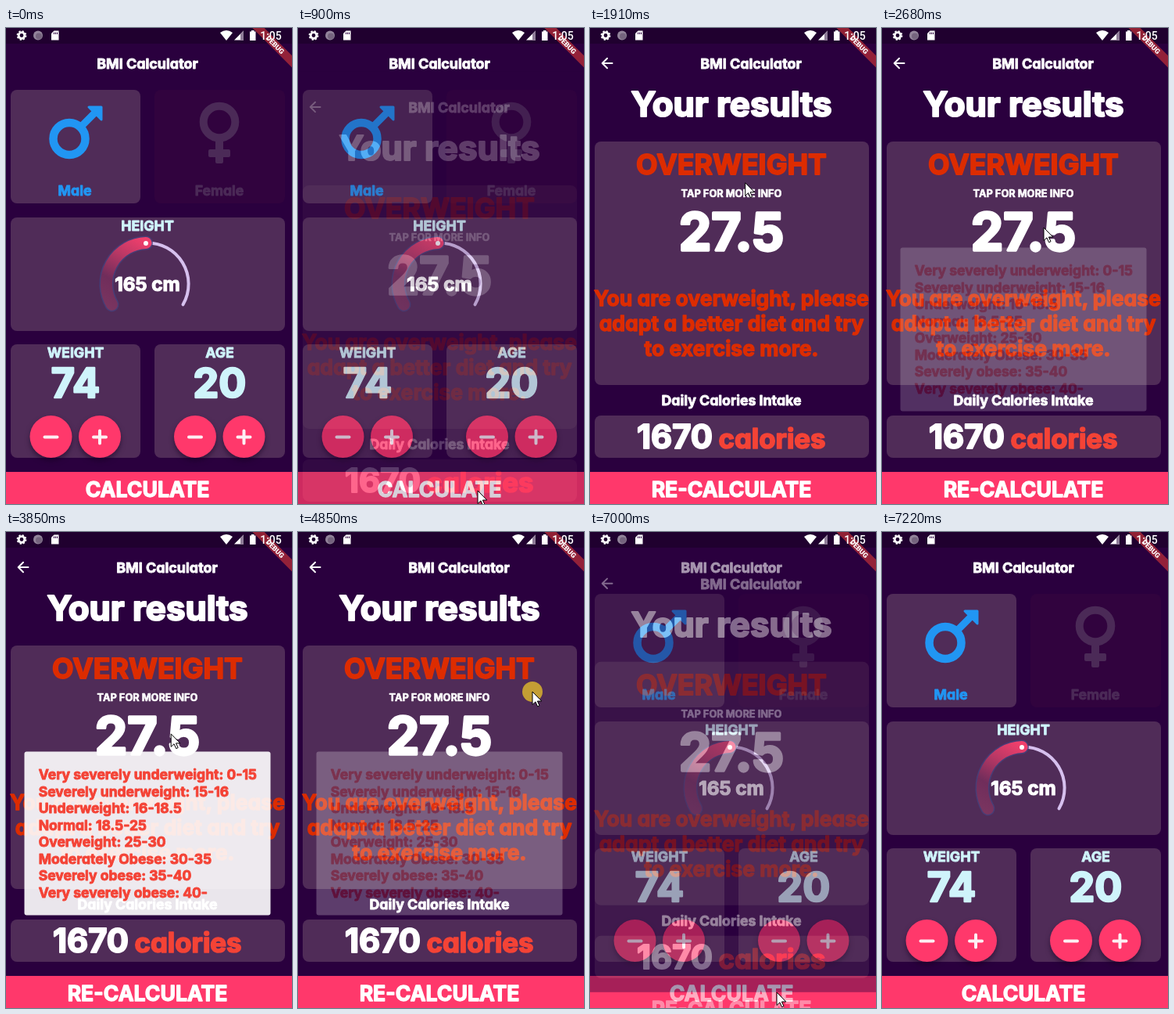
An HTML page that plays this animation: 366x608 px, repeating every 7810 ms.

```html
<!DOCTYPE html>
<html lang="en">
<head>
<meta charset="utf-8">
<title>BMI Calculator</title>
<style>
html, body { margin: 0; width: 100%; height: 100%; overflow: hidden; background: #2a003e; }
svg { display: block; width: 100%; height: 100%; }
.t {
  font-family: Inter, sans-serif; font-weight: 700; font-feature-settings: "cv11";
  stroke-width: .05em; stroke-linejoin: round;
}
.sys { font-family: Roboto, sans-serif; fill: #fff; }
.line { fill: none; stroke-linecap: round; stroke-linejoin: round; }
.btn { filter: drop-shadow(0 4px 3px rgba(20, 0, 30, .5)); }
</style>
</head>
<body>
<svg id="stage" viewBox="0 0 366 608"></svg>
<script>
const LOOP = 7810;
const BG = '#2a003e', CARD = '#502c58', PINK = '#ff386b', RED = '#f44336',
      ALERT = '#dd2c00', BLUE = '#2196f3', ICE = '#cff4fb', DIM = '#4b2a57', WHITE = '#fff';

// Drawing helpers
const text = (x, y, size, str, fill = WHITE, anchor = 'middle') =>
  `<text class="t" x="${x}" y="${y}" font-size="${size}" text-anchor="${anchor}" fill="${fill}" stroke="${fill}">${str}</text>`;
const rect = (x, y, w, h, fill = CARD, r = 8) =>
  `<rect x="${x}" y="${y}" width="${w}" height="${h}" rx="${r}" fill="${fill}"/>`;
const line = (d, stroke, width, extra = '') =>
  `<path class="line" d="${d}" stroke="${stroke}" stroke-width="${width}" ${extra}/>`;
const ring = (x, y, r, stroke, width) =>
  `<circle cx="${x}" cy="${y}" r="${r}" fill="none" stroke="${stroke}" stroke-width="${width}"/>`;
const button = (x, plus) =>
  `<circle class="btn" cx="${x}" cy="522" r="27" fill="${PINK}"/>` +
  line(`M${x - 8} 522.5h16${plus ? `M${x} 514.5v16` : ''}`, '#fdeff3', 4);
const counter = (x, w, label, value) => {
  const mid = x + w / 2;
  return rect(x, 404, w, 145) + text(mid, 421, 17.8, label, ICE) + text(mid, 472, 52, value, ICE) +
    button(mid - 31.5, false) + button(mid + 31, true);
};
const page = (...parts) => rect(0, 0, 366, 608, BG, 0) + parts.join('');
const bottomBar = label => rect(0, 567, 366, 41, PINK, 0) + text(181, 598.6, 26.6, label);

const male =
  ring(81, 141.5, 20.5, BLUE, 10.5) + line('M97 125L114 108', BLUE, 9) +
  `<path d="M106 101H122V117Z" fill="${BLUE}" stroke="${BLUE}" stroke-width="3" stroke-linejoin="round"/>`;
const female =
  ring(273, 120, 20.3, DIM, 10) +
  rect(268, 143, 10, 30, DIM, 2) + rect(259, 155, 28, 10, DIM, 2);

const arc = 'M135.5 353.3A52.5 52.5 0 0 1 179 274.5';
const dial =
  line('M179 274.5A52.5 52.5 0 0 1 226.5 353.3', '#d6c0ee', 4) +
  line(arc, '#46407c', 18, 'opacity=".85"') + line(arc, 'url(#bar)', 15) +
  `<circle cx="179" cy="275" r="3" fill="#fff"/>` + text(181, 336, 24.3, '165 cm');

const home = page(
  text(181, 52, 17.9, 'BMI Calculator'),
  rect(6, 79, 166, 145), rect(190, 79, 167, 145, '#31033e'),
  male, female, text(88, 214, 17.7, 'Male', BLUE), text(273, 214, 17.6, 'Female', DIM),
  rect(6, 242, 351, 145), text(181, 259, 17.8, 'HEIGHT', ICE), dial,
  counter(6, 166, 'WEIGHT', '74'), counter(190, 167, 'AGE', '20'),
  bottomBar('CALCULATE'));

const ranges = ['Very severely underweight: 0-15', 'Severely underweight: 15-16',
  'Underweight: 16-18.5', 'Normal: 18.5-25', 'Overweight: 25-30',
  'Moderately Obese: 30-35', 'Severely obese: 35-40', 'Very severely obese: 40-'];
const advice = ['You are overweight, please', 'adapt a better diet and try', 'to exercise more.'];

const tip = rect(23.5, 280.5, 315, 209, 'rgba(255,255,255,.9)', 3) +
  ranges.map((s, i) => text(41.7, 316 + 21.5 * i, 17.55, s, RED, 'start')).join('');

const results = page(
  line('M28.5 45H16M22 38.8L15.7 45L22 51.2', WHITE, 2),
  text(206, 52, 17.9, 'BMI Calculator'), text(181, 113, 43.8, 'Your results'),
  rect(6, 145, 351, 311), text(181, 187, 35.7, 'OVERWEIGHT', ALERT),
  text(181, 216, 12.8, 'TAP FOR MORE INFO'), text(181, 284, 66, '27.5'),
  advice.map((s, i) => text(181, 355 + 32 * i, 26.5, s, ALERT)).join(''),
  text(181, 482, 17.7, 'Daily Calories Intake'),
  rect(6, 495, 351, 54), text(108.5, 537, 41.8, '1670'), text(233, 537, 34.8, 'calories', RED),
  bottomBar('RE-CALCULATE'),
  `<g id="tip">${tip}</g>`);

const banner =
  `<g transform="translate(366 0) rotate(45)">
    <rect x="-36" y="25" width="72" height="10.7" fill="#c03038" fill-opacity=".7"/>
    <text class="sys" y="33.6" font-size="9" font-weight="900" text-anchor="middle">DEBUG</text>
  </g>`;

const statusBar =
  rect(0, 0, 366, 20, 'rgba(0,0,0,.25)', 0) + banner +
  ring(20, 9.5, 3.8, WHITE, 2.8) +
  `<circle cx="20" cy="9.5" r="5.5" fill="none" stroke="#fff" stroke-width="1.8" stroke-dasharray="2.2 2.12"/>
  <circle cx="41" cy="9.5" r="6" fill="#93849b"/><circle cx="42" cy="10.5" r="4" fill="#75647e"/>
  <path d="M61.5 3.5H67.5V15.5H58V7Z" fill="#fff"/>
  <path d="M61.5 5.5v2.5M63.5 5.5v2.5M65.5 5.5v2.5" stroke="#2a003e"/>
  <path d="M274 6Q282 0 290 6L282 16Z M292 15.5L304 3.5V15.5Z" fill="#fff"/>
  <path d="M300 7.5V15.5H304V3.5Z" fill="#8f7d98"/>
  <path d="M312 4.5H314V3H317.5V4.5H319.5V16H312Z" fill="#fff"/>
  <text class="sys" x="339" y="14.8" font-size="14" font-weight="500" text-anchor="middle">1:05</text>`;

const pointer =
  `<circle id="click" r="13" fill="#ebc428" fill-opacity=".75"/>
  <path d="M0 0V16.5L3.9 12.9L6.6 18.8L9 17.7L6.4 12H11.8Z" fill="#fff" stroke="#000" stroke-width="1" stroke-linejoin="round"/>`;

const $ = id => document.getElementById(id);
$('stage').innerHTML =
  `<defs><linearGradient id="bar" gradientUnits="userSpaceOnUse" x1="130" y1="358" x2="179" y2="272">
    <stop offset="0" stop-color="#7a3560"/><stop offset=".35" stop-color="#702d5b"/>
    <stop offset=".7" stop-color="#bb3865"/><stop offset="1" stop-color="#f03f6c"/>
  </linearGradient></defs>
  <g>${home}</g><g id="results">${results}</g>${statusBar}<g id="pointer">${pointer}</g>`;

// Motion
const clamp = v => Math.min(1, Math.max(0, v));
const ramp = (t, start, length) => clamp((t - start) / length);
const bezier = (x1, y1, x2, y2) => v => {
  if (v <= 0 || v >= 1) return clamp(v);
  const at = (a, b, s) => 3 * a * s * (1 - s) ** 2 + 3 * b * s * s * (1 - s) + s ** 3;
  let lo = 0, hi = 1;
  for (let i = 0; i < 24; i++) {
    const mid = (lo + hi) / 2;
    if (at(x1, x2, mid) < v) lo = mid; else hi = mid;
  }
  return at(y1, y2, lo);
};
const fastOutSlowIn = bezier(.4, 0, .2, 1);
const easeIn = bezier(.42, 0, 1, 1);

// Pointer path as [time, x, y]
const path = [
  [290, 243, 600], [460, 230, 591], [1100, 230, 591], [1250, 255, 497], [1400, 228, 300],
  [1560, 184, 124], [1700, 191, 145], [2140, 207, 255], [3830, 207, 255], [3850, 211, 257],
  [4200, 270, 553], [4620, 300, 262], [4710, 300, 204], [5110, 300, 204], [5720, 239, 588], [7210, 239, 588]
];
const clicks = [[500, 770], [2510, 2640], [4720, 4890], [5780, 6870]];

function pointerAt(t) {
  const i = Math.max(1, path.findIndex(p => p[0] > t));
  const [t0, x0, y0] = path[i - 1], [t1, x1, y1] = path[i];
  const k = ramp(t, t0, t1 - t0);
  return [x0 + (x1 - x0) * k, y0 + (y1 - y0) * k];
}

function draw(t) {
  const open = ramp(t, 770, 320) - ramp(t, 6868, 320);
  $('results').setAttribute('opacity', easeIn(open));
  $('results').setAttribute('transform', `translate(0 ${152 * (1 - fastOutSlowIn(open))})`);
  $('tip').setAttribute('opacity', fastOutSlowIn(ramp(t, 2650, 130) - ramp(t, 4740, 150)));

  const shown = t >= 290 && t < 7210;
  $('pointer').style.display = shown ? '' : 'none';
  if (shown) $('pointer').setAttribute('transform', `translate(${pointerAt(t)})`);
  $('click').style.display = clicks.some(([a, b]) => t >= a && t < b) ? '' : 'none';
}

const start = performance.now();
function tick() {
  draw((performance.now() - start) % LOOP);
  requestAnimationFrame(tick);
}
tick();
</script>
</body>
</html>
```
